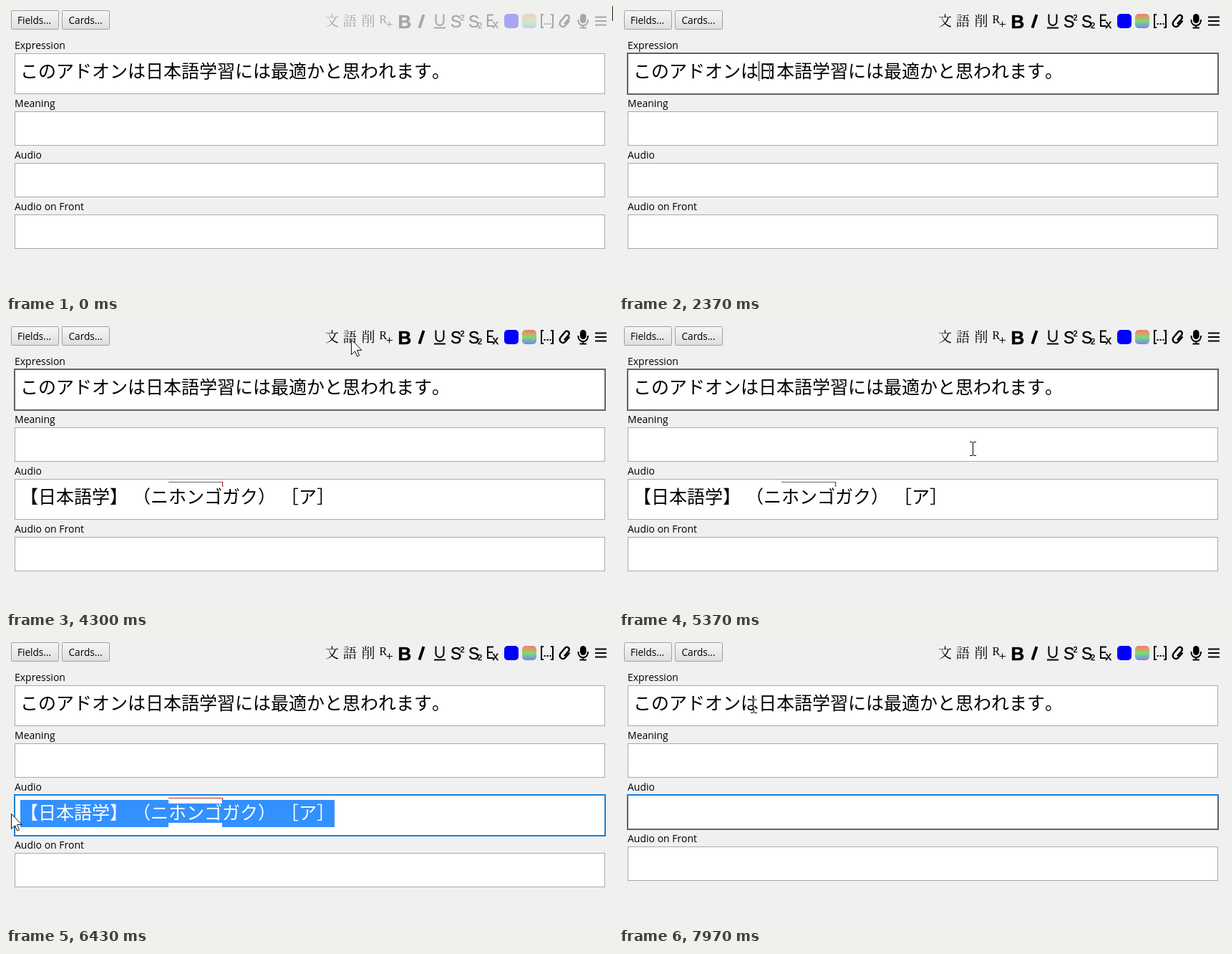
An HTML page that plays this animation: 848x402 px, repeating every 8 s.

```html
<!DOCTYPE html>
<html lang="ja">
<head>
<meta charset="utf-8">
<title>Card editor</title>
<style>
html, body { margin: 0; width: 100%; height: 100%; overflow: hidden; background: #f0f0f0; }
svg { display: block; width: 848px; height: 402px; }
text { white-space: pre; }
.ui { font: 14px "Open Sans", "Noto Sans", sans-serif; }
.btn { font-size: 13.6px; }
.jp { font: 300 25px "Noto Sans CJK JP", "Noto Sans CJK", sans-serif; text-spacing-trim: space-all; font-kerning: none; }
.field { fill: #fff; stroke: #a9a9a9; }
.focus { fill: none; stroke: #626262; stroke-width: 2; }
.kanji { font: 19px "Noto Serif CJK JP", "Noto Sans CJK JP", serif; text-anchor: middle; }
.glyph { font: 25px "Liberation Sans", Arial, sans-serif; }
.line { fill: none; stroke: #000; stroke-width: 2; }
#caret { fill: #000; }
#beam { fill: none; stroke: #fff; mix-blend-mode: difference; }
</style>
</head>
<body>
<svg viewBox="0 0 848 402">
  <defs>
    <linearGradient id="btn" x2="0" y2="1"><stop stop-color="#f6f6f6"/><stop offset="1" stop-color="#dedede"/></linearGradient>
    <linearGradient id="rainbow" x2="0" y2="1">
      <stop stop-color="#f07a6a"/><stop offset=".25" stop-color="#d8a268"/>
      <stop offset=".52" stop-color="#78e070"/><stop offset=".75" stop-color="#78b0b8"/><stop offset="1" stop-color="#8080ee"/>
    </linearGradient>
    <clipPath id="sel"><rect id="selBox" y="220" height="50"/></clipPath>
  </defs>
  <rect width="848" height="402" fill="#f0f0f0"/>

  <g fill="url(#btn)" stroke="#a0a0a0">
    <rect x="7.5" y="6.5" width="66" height="26" rx="1"/>
    <rect x="78.5" y="6.5" width="66" height="26" rx="1"/>
  </g>
  <text class="ui btn" x="16" y="25">Fields...</text>
  <text class="ui btn" x="87.5" y="25">Cards...</text>

  <g id="tools">
    <g class="kanji"><text x="455.5" y="28">文</text><text x="480.5" y="28">語</text><text x="506" y="28">削</text></g>
    <text x="521.5" y="24" font-family="Liberation Serif, serif" font-size="16">R</text>
    <path class="line" style="stroke-width:1" d="M531.5 25.5h8.500M535.5 21.500v8"/>
    <text class="glyph" x="547.5" y="30.500" style="font-weight:700;font-size:26px" stroke="#000" stroke-width=".6">B</text>
    <path class="line" style="stroke-width:4" d="M583.5 12L577.500 30.500"/>
    <path class="line" d="M600.5 11.500v10a5.500 5.500 0 0 0 11 0v-10M598 30.500h16"/>
    <g class="glyph" stroke="#000" stroke-width=".4">
      <text x="621" y="30" textLength="auto" style="font-size:23px">S</text>
      <text x="634.5" y="20" style="font-size:11px">2</text>
      <text x="646" y="30" style="font-size:23px">S</text>
      <text x="659" y="31" style="font-size:11px">2</text>
      <text x="679.5" y="31" style="font-size:17px">x</text>
    </g>
    <path class="line" d="M681 12.500H673V28H681M673 20H680"/>
    <rect x="696" y="11" width="20" height="20" rx="5" fill="#00f"/>
    <rect x="721" y="11" width="20" height="20" rx="5" fill="url(#rainbow)"/>
    <path class="line" d="M751 12H748V30H751M761 12H764V30H761"/>
    <path class="line" stroke-dasharray="2.200 1.800" d="M751.500 25h10"/>
    <path class="line" style="stroke-width:2.4" transform="translate(781 21) rotate(40)" d="M4.500-4.500V4.500a4.500 4.500 0 0 1-9 0V-5.500a3 3 0 0 1 6.500 0V4"/>
    <rect x="802" y="11" width="8.500" height="13" rx="4.200"/>
    <path class="line" d="M799.500 19v1.500a6.700 6.700 0 0 0 13.400 0V19M806.200 27v3.500M801.500 30.500h9.400"/>
    <path class="line" d="M823 15.500h16M823 21h16M823 26.500h16"/>
  </g>

  <g class="ui">
    <text x="12" y="60">Expression</text>
    <text x="12" y="141">Meaning</text>
    <text x="12" y="213">Audio</text>
  </g>
  <rect class="field" x="12.500" y="66.500" width="824" height="56"/>
  <rect class="field" x="12.500" y="147.500" width="824" height="47"/>
  <rect class="field" id="audio" x="12.500" y="219.500" width="824" height="47"/>
  <g id="front">
    <text class="ui" x="12" y="285">Audio on Front</text>
    <rect class="field" x="12.500" y="291.500" width="824" height="47"/>
  </g>
  <rect class="focus" id="focus1" x="12" y="66" width="825" height="57"/>
  <rect class="focus" id="focus2" x="12" y="219" width="825"/>
  <path id="blueTop" d="M12 223V219H837V223" fill="none" stroke="#1a80d4" stroke-width="2"/>

  <text class="jp" x="20" y="100">このアドオンは日本語学習には最適かと思われます。</text>
  <g id="entry">
    <g class="jp" id="words">
      <text x="20" y="253">【日本語学】</text><text x="177" y="253">（ニホンゴガク）</text><text x="384" y="253">［ア］</text>
    </g>
    <path id="pitch" d="M227 223.500H303" stroke="#666"/>
    <path d="M302.500 223V230" stroke="#d03030" stroke-width="1.500"/>
    <g clip-path="url(#sel)">
      <path fill="#3390ff" d="M20 226H227V231H302V226H459V264H302V258H227V264H20Z"/>
      <use href="#words" fill="#fff"/>
    </g>
  </g>
  <rect id="caret" width="1" height="28"/>
  <path id="arrow" d="M.500 .500V21.500L5.500 16.800L8.500 24L11.500 22.700L8.500 15.500H15Z" fill="#fff" stroke="#111"/>
  <path id="beam" d="M-4-9.500H-1L.500-8.500L2-9.500H5M.500-8.500V8.500M-4 9.500H-1L.500 8.500L2 9.500H5"/>
</svg>
<script>
const LOOP = 8000;
const $ = id => document.getElementById(id);
const show = (id, on) => $(id).style.display = on ? '' : 'none';
const within = (t, a, b) => t >= a && t < b;

const glide = u => { const v = u ** .7; return v * v * (3 - 2 * v); };
const fling = u => 1 - (1 - u) ** 2.7;
const linear = u => u;

// start, end, target x, target y, easing
const moves = [
  [270, 1070, 269, 95, glide],
  [1070, 1800, 210, 92, fling],
  [2370, 3170, 476, 25, glide],
  [3230, 3370, 482, 24, linear],
  [5070, 5670, 500, 251, glide],
  [5900, 6430, 7, 245, fling],
  [7130, 7930, 188, 97, glide],
  [7960, 7970, 188, 95, linear]
];

// start, end, x, y
const carets = [
  [1970, 2570, 195, 77], [3100, 3630, 195, 77],
  [3630, 4300, 20, 77], [4830, 5360, 20, 77],
  [6930, 7460, 20, 230]
];

// character edges; two narrow spaces separate the three groups
const edges = [];
for (const [x, n] of [[20, 6], [177, 8], [384, 3]])
  for (let i = 0; i <= n; i++) edges.push(x + i * 25);

function pointer(t) {
  let x = 847, y = -1;
  for (const [a, b, tx, ty, ease] of moves) {
    if (t < a) break;
    const k = ease(Math.min(1, (t - a) / (b - a)));
    x += (tx - x) * k;
    y += (ty - y) * k;
  }
  return [Math.round(x), Math.round(y)];
}

function draw(t) {
  const filled = within(t, 3770, 6930), audioFocus = t >= 5900;
  const height = filled ? 57 : 48;

  $('tools').setAttribute('opacity', t < 1970 ? .3 : 1);
  show('focus1', within(t, 1970, 5900));
  show('focus2', audioFocus);
  show('blueTop', audioFocus);
  $('focus2').setAttribute('height', height);
  $('focus2').style.stroke = filled ? '#1a80d4' : '';
  $('audio').setAttribute('height', height - 1);
  $('front').setAttribute('transform', `translate(0 ${filled ? 9 : 0})`);
  show('entry', filled);

  // the selection trails the pointer slightly
  const px = pointer(t - 50)[0];
  const from = audioFocus
    ? edges.reduce((a, e) => Math.abs(e - px) < Math.abs(a - px) ? e : a) : 459;
  $('selBox').setAttribute('x', from);
  $('selBox').setAttribute('width', 459 - from);
  $('pitch').setAttribute('stroke', from < 227 ? '#b03838' : '#666');

  const caret = carets.find(c => within(t, c[0], c[1]));
  show('caret', caret);
  if (caret) {
    $('caret').setAttribute('x', caret[2]);
    $('caret').setAttribute('y', caret[3]);
  }

  const [x, y] = pointer(t);
  const inField = within(x, 12, 837) &&
    (within(y, 66, 123) || within(y, 147, 195) || within(y, 219, 219 + height));
  show('beam', inField);
  show('arrow', !inField);
  $(inField ? 'beam' : 'arrow').setAttribute('transform', `translate(${x} ${y})`);
}

const start = performance.now();
function tick(now) {
  draw(Math.max(0, now - start) % LOOP);
  requestAnimationFrame(tick);
}
draw(0);
requestAnimationFrame(tick);
</script>
</body>
</html>
```
